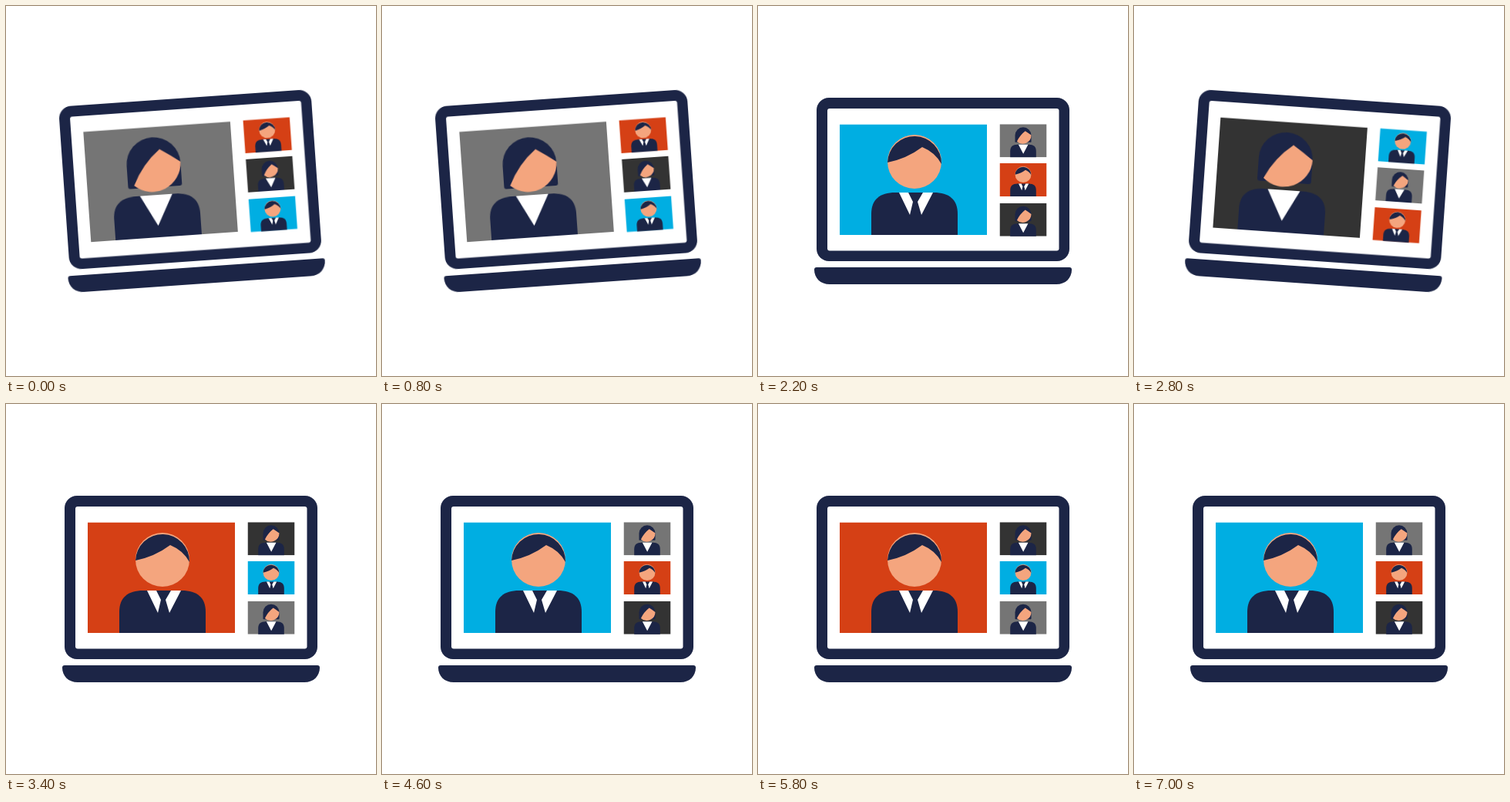
Write an HTML page that moves like this. It is 480x480 px and loops after 7200 ms.

```html
<!DOCTYPE html>
<html lang="en">
<head>
<meta charset="utf-8">
<title>Video call</title>
<style>
  html, body { margin: 0; width: 100%; height: 100%; overflow: hidden; background: #fff; }
  #stage { display: block; width: 100vw; height: 100vh; }
  .navy { fill: #1c2546; }
  .skin { fill: #f4a57e; }
  .white { fill: #fff; }
  #laptop { transform-origin: 240px 240px; animation: tilt 800ms step-end infinite; }
  .tile { visibility: hidden; animation: show 800ms step-end infinite; }
  @keyframes tilt {
    0% { transform: rotate(-4deg); }
    25%, 75%, 100% { transform: rotate(0deg); }
    50% { transform: rotate(4deg); }
  }
  @keyframes show {
    0% { visibility: visible; }
    25%, 100% { visibility: hidden; }
  }
</style>
</head>
<body>
<svg id="stage" viewBox="0 0 480 480">
  <defs>
    <path id="torso" class="navy" d="M-56 298V270C-56 251-45 242-25 242H25C45 242 56 251 56 270V298Z"/>
    <g id="man">
      <circle class="skin" cy="202" r="35"/>
      <path class="navy" d="M-35 203A35 35 0 0 1 35 205Q27 190 10 183Q-10 198-35 203Z"/>
      <use href="#torso"/>
      <path class="white" d="M-20 242H-8L-2 254L-6 271ZM24 242H11L4 254L9 271Z"/>
    </g>
    <g id="woman">
      <path class="navy" d="M-35 229V202A35 35 0 0 1 35 202V229Q35 232 32 232H-32Q-35 232-35 229Z"/>
      <path class="skin" d="M9 183Q23 192 35 201A37 37 0 0 1-27 228Q-14.5 201 9 183Z"/>
      <use href="#torso"/>
      <path class="white" d="M-20.5 242H21.5L.5 282Z"/>
    </g>
  </defs>
  <g id="laptop">
    <rect class="navy" x="76" y="119" width="328" height="212" rx="16"/>
    <rect class="white" x="90" y="133" width="300.5" height="184.5" rx="3"/>
    <path class="navy" d="M76 339H404Q407 339 407 342C407 353 399 361 387 361H93C81 361 73 353 73 342Q73 339 76 339Z"/>
  </g>
</svg>
<script>
  const STEP = 200;
  const people = [
    { fill: '#757575', figure: 'woman', shift: -7.5 },
    { fill: '#d54015', figure: 'man', shift: 1.5 },
    { fill: '#333333', figure: 'woman', shift: -7.5 },
    { fill: '#00aee2', figure: 'man', shift: 1.5 }
  ];
  const slots = [
    { x: 106, y: 153.5, w: 191, h: 143.5, scale: 1 },
    ...[153.3, 204, 255.7].map(y => ({ x: 313.5, y, w: 61, h: 43, scale: 0.3 }))
  ];
  const laptop = document.getElementById('laptop');

  function add(parent, tag, attrs) {
    const el = document.createElementNS('http://www.w3.org/2000/svg', tag);
    for (const key in attrs) el.setAttribute(key, attrs[key]);
    return parent.appendChild(el);
  }

  // Everyone moves up one slot per step; the main speaker goes to the end.
  slots.forEach((slot, s) => {
    const w = slot.w / slot.scale, h = slot.h / slot.scale;
    const view = add(laptop, 'svg', {
      x: slot.x, y: slot.y, width: slot.w, height: slot.h,
      viewBox: `${-w / 2} 153.5 ${w} ${h}`
    });
    people.forEach((person, p) => {
      const turn = (p - s + 4) % 4;
      const tile = add(view, 'g', { class: 'tile', style: `animation-delay:${(turn - 4) * STEP}ms` });
      add(tile, 'rect', { x: -w / 2, y: 153.5, width: w, height: h, fill: person.fill });
      add(tile, 'use', { href: '#' + person.figure, x: s ? 0 : person.shift });
    });
  });
</script>
</body>
</html>
```
